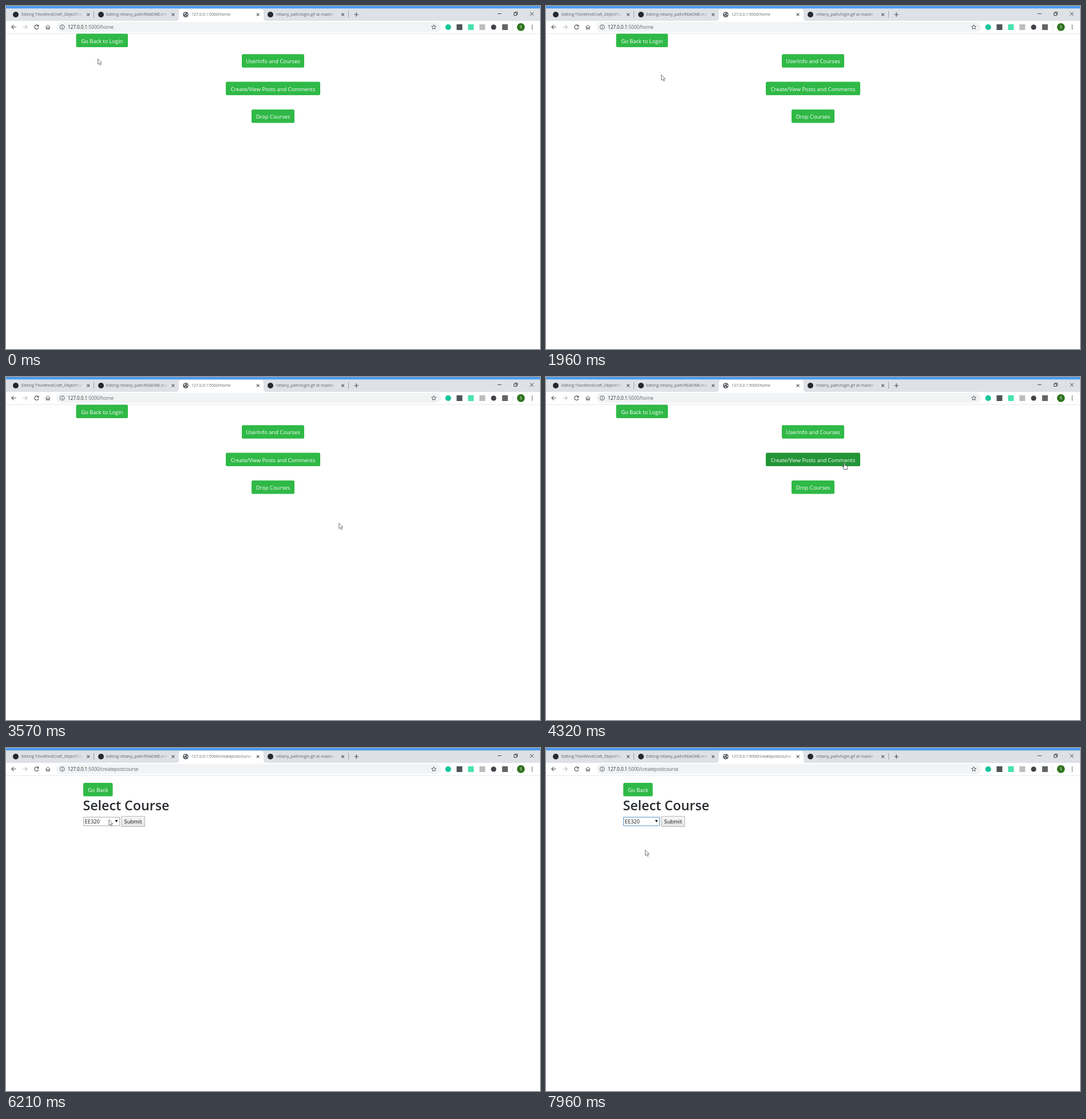
Recreate the animation shown at these times as an HTML page with a canvas. Size 933x600 px, loop 8 s.

```html
<!DOCTYPE html>
<html lang="en">
<head>
<meta charset="utf-8">
<title>Course pages</title>
<style>
  html, body { margin: 0; width: 100%; height: 100%; overflow: hidden; background: #fff; }
  canvas { display: block; width: 933px; height: 600px; }
</style>
</head>
<body>
<canvas id="stage"></canvas>
<script>
const W = 933, H = 600, LOOP = 8000;
const LOAD_START = 4950, PAGE_SWITCH = 5000, LOAD_END = 5500, FOCUS = 6700;
const FONT = '"Open Sans", "Noto Sans", sans-serif';
const INK = '#4d5156', GREEN = '#30b947', GREEN_HOVER = '#239537';

const canvas = document.getElementById('stage');
const ctx = canvas.getContext('2d');
const ratio = window.devicePixelRatio || 1;
canvas.width = W * ratio;
canvas.height = H * ratio;

const homeButtons = [
  { label: 'Go Back to Login', x: 122.5, y: 48.5, w: 90.5 },
  { label: 'UserInfo and Courses', x: 412, y: 84.3, w: 109 },
  { label: 'Create/View Posts and Comments', x: 384, y: 132.6, w: 165 },
  { label: 'Drop Courses', x: 429, y: 181, w: 75 }
];
const BUTTON_H = 23.5;

// Pointer path: time, x, y
const path = [
  [0, 160, 92], [1900, 160, 92], [2360, 470, 302], [2750, 696, 499],
  [2930, 735, 585], [3180, 668, 395], [3600, 575, 245], [4000, 530, 172],
  [4320, 521.5, 150], [4900, 521.5, 150], [5020, 518, 149], [5440, 518, 149],
  [5640, 455, 141], [5980, 225, 126], [6210, 179.5, 125], [6900, 178, 127],
  [7320, 177, 138], [7700, 173, 178], [8000, 173, 178]
];

function pointerAt(t) {
  let i = 1;
  while (i < path.length - 1 && t > path[i][0]) i++;
  const [t0, x0, y0] = path[i - 1], [t1, x1, y1] = path[i];
  const k = (t - t0) / (t1 - t0);
  return { x: x0 + (x1 - x0) * k, y: y0 + (y1 - y0) * k };
}

function text(str, x, y, size, color, align = 'left', weight = 400) {
  ctx.font = `${weight} ${size}px ${FONT}`;
  ctx.textAlign = align;
  ctx.fillStyle = color;
  ctx.fillText(str, x, y);
}

function rect(x, y, w, h, color) {
  ctx.fillStyle = color;
  ctx.fillRect(x, y, w, h);
}

function round(x, y, w, h, r, color) {
  ctx.beginPath();
  ctx.roundRect(x, y, w, h, r);
  ctx.fillStyle = color;
  ctx.fill();
}

function disc(x, y, r, color) {
  ctx.beginPath();
  ctx.arc(x, y, r, 0, Math.PI * 2);
  ctx.fillStyle = color;
  ctx.fill();
}

function stroke(d, color = INK, width = 1, x = 0, y = 0) {
  ctx.save();
  ctx.translate(x, y);
  ctx.strokeStyle = color;
  ctx.lineWidth = width;
  ctx.stroke(new Path2D(d));
  ctx.restore();
}

function shape(d, x, y, fill, line) {
  const p = new Path2D(d);
  ctx.save();
  ctx.translate(x, y);
  ctx.fillStyle = fill;
  ctx.fill(p);
  if (line) {
    ctx.strokeStyle = line;
    ctx.lineWidth = 0.8;
    ctx.lineJoin = 'round';
    ctx.stroke(p);
  }
  ctx.restore();
}

function cross(x, y, r, width, color = INK) {
  stroke(`M${-r} ${-r}L${r} ${r}M${r} ${-r}L${-r} ${r}`, color, width, x, y);
}

function tabTitle(str, x, right, color, back) {
  ctx.save();
  ctx.beginPath();
  ctx.rect(x, 6, right - x, 18);
  ctx.clip();
  text(str, x, 17.4, 6.92, color);
  const fade = ctx.createLinearGradient(right - 14, 0, right, 0);
  fade.addColorStop(0, back + '00');
  fade.addColorStop(1, back);
  rect(right - 14, 6, 14, 18, fade);
  ctx.restore();
}

function globe() {
  disc(314, 15, 4.8, '#54585d');
  shape('M-3.4 -1.6L-1 -3.8L.4 -2.8L-.8 -1.2L-2.4 .4ZM1 -1.4L3.6 -1.6L3.8 .8L2.4 1.2ZM-1.6 .8L.8 1.4L.2 3.8L-1 3Z',
    314, 15, '#e2e5e8');
}

function spinner(t) {
  const start = (t - 5290) / 1568 * Math.PI * 2;
  ctx.beginPath();
  ctx.arc(314, 15, 4.5, start, start + Math.PI * 1.36);
  ctx.strokeStyle = '#4285d8';
  ctx.lineWidth = 1.3;
  ctx.stroke();
}

function drawTabs(t, loading, route) {
  const strip = '#dee1e6';
  rect(0, 0, W, 26, strip);
  rect(0, 0, W, 4.3, '#4b9bf0');
  shape('M297 26Q302 26 302 21V10Q302 5 307 5H445Q450 5 450 10V21Q450 26 455 26Z', 0, 0, '#fff');

  for (const x of [17, 166, 462]) disc(x, 15, 5, '#25292e');
  tabTitle('Editing TilvoWindCraft_ObjectTracking', 27, 134, '#5f6368', strip);
  tabTitle('Editing nittany_path/README.md at', 175, 284, '#5f6368', strip);
  tabTitle('127.0.0.1:5000' + route, 324, 434, '#5f6368', '#ffffff');
  tabTitle('nittany_path/login.gif at master', 472, 578, '#5f6368', strip);
  if (loading) spinner(t); else globe();

  for (const x of [143.7, 292, 440.2, 588.5]) cross(x, 15, 2.3, 1.1);
  stroke('M153.5 9V20.5M598.5 9V20.5', '#8d9196', 0.8);
  stroke('M608.5 15H616M612.2 11.2V18.8', INK, 1.2);

  stroke('M859 13.5H865.5', '#333', 0.9);
  stroke('M887.5 12H892V16.5H887.5ZM889 12V10.6H893.5V15H892', '#333', 0.9);
  cross(918.7, 13.7, 3.1, 0.9, '#333');
}

function drawToolbar(loading, route) {
  rect(0, 26, W, 22, '#fff');
  rect(0, 47.8, W, 0.8, '#dcdee1');

  stroke('M17.6 36.7H10M13.5 33.1L9.9 36.7L13.5 40.3', INK, 1.1);
  stroke('M29.5 36.7H37.1M33.6 33.1L37.2 36.7L33.6 40.3', '#b9bcc0', 1.1);
  if (loading) {
    cross(53.5, 36.8, 3.2, 1.3);
  } else {
    stroke('M56.2 34.4A3.6 3.6 0 1 0 57 37.7', INK, 1.2);
    shape('M57.4 32.5V36.1H53.8Z', 0, 0, INK);
  }
  stroke('M69.2 37.2L73.2 33.2L77.2 37.2M70.5 36.4V40.5H72.2V37.8H74.2V40.5H75.9V36.4', INK, 1);

  round(88, 28, 672, 17.6, 8.8, '#f1f3f4');
  ctx.beginPath();
  ctx.arc(98.2, 36.8, 3.9, 0, Math.PI * 2);
  ctx.strokeStyle = INK;
  ctx.lineWidth = 0.9;
  ctx.stroke();
  rect(97.7, 36.2, 1, 2.8, INK);
  rect(97.7, 34.4, 1, 1, INK);

  const host = '127.0.0.1';
  text(host, 108, 39.9, 8.1, '#26282b');
  text(':5000' + route, 108 + ctx.measureText(host).width, 39.9, 8.1, '#62666b');

  let star = '';
  for (let i = 0; i < 10; i++) {
    const a = -Math.PI / 2 + i * Math.PI / 5, r = i % 2 ? 1.9 : 4.3;
    star += `${i ? 'L' : 'M'}${Math.cos(a) * r} ${Math.sin(a) * r}`;
  }
  stroke(star + 'Z', INK, 0.9, 747.5, 37);

  disc(772.6, 37, 5.1, '#17c69b');
  rect(787.3, 32, 10, 10, '#4f5459');
  rect(807.3, 32, 10, 10, '#48e3ae');
  rect(827.2, 32, 10, 10, '#bdbdbd');
  disc(852, 37, 4.6, '#3f4246');
  rect(866.8, 32, 10, 10, '#626466');
  rect(885, 31.5, 0.8, 11, '#d8e3f3');
  disc(899.6, 36.8, 6.9, '#2f741f');
  text('S', 899.6, 39.4, 7, '#fff', 'center');
  for (const y of [33.6, 36.8, 40]) disc(919.4, y, 0.95, INK);
}

const inside = (b, p) =>
  p.x >= b.x && p.x <= b.x + b.w && p.y >= b.y && p.y <= b.y + BUTTON_H;

function button(b, hover) {
  round(b.x, b.y, b.w, BUTTON_H, 2.5, hover ? GREEN_HOVER : GREEN);
  text(b.label, b.x + b.w / 2, b.y + 16, 9.4, '#fff', 'center');
}

function drawCoursePage(focused) {
  button({ label: 'Go Back', x: 135, y: 61, w: 51.5 }, false);
  text('Select Course', 134.5, 109.3, 23.2, '#292d31', 'left', 600);

  stroke('M135.5 121H198.5V136H135.5Z', focused ? '#5b8fc7' : '#a6a6a6', 1);
  text('EE320', 137.6, 132.3, 9.25, '#111');
  shape('M190.6 126H195.4L193 130.2Z', 0, 0, '#111');

  const face = ctx.createLinearGradient(0, 119, 0, 138);
  face.addColorStop(0, '#f8f8f8');
  face.addColorStop(1, '#e2e2e2');
  rect(201.5, 119.5, 41, 18, face);
  stroke('M201.5 119.5H242.5V137.5H201.5Z', '#b4b4b4', 0.9);
  text('Submit', 222, 132.3, 9.35, '#111', 'center');
}

function drawPointer(p, hand) {
  if (hand) {
    shape('M-1 1Q0 -.6 1 1V4.6L4.6 5.4Q5.8 5.8 5.6 7.2L4.8 11.6H-.8L-3.4 7.6Q-3.8 6.2 -2.4 6.4L-1 7.6Z',
      p.x, p.y, '#fff', '#333');
  } else {
    shape('M.4 .4V10L2.7 8L4.4 11.5L6 10.8L4.4 7.4H7.2Z', p.x, p.y, '#fff', '#555');
  }
}

function draw(t) {
  const home = t < PAGE_SWITCH;
  const loading = t >= LOAD_START && t < LOAD_END;
  const route = home ? '/home' : '/createpostcourse';
  const p = pointerAt(t);
  const hovered = home && homeButtons.find(b => inside(b, p));

  ctx.setTransform(ratio, 0, 0, ratio, 0, 0);
  rect(0, 0, W, H, '#fff');
  drawTabs(t, loading, route);
  drawToolbar(loading, route);
  if (home) homeButtons.forEach(b => button(b, b === hovered));
  else drawCoursePage(t >= FOCUS);
  drawPointer(p, hovered);
}

const begin = performance.now();
function tick() {
  draw((performance.now() - begin) % LOOP);
  requestAnimationFrame(tick);
}
tick();
</script>
</body>
</html>
```
